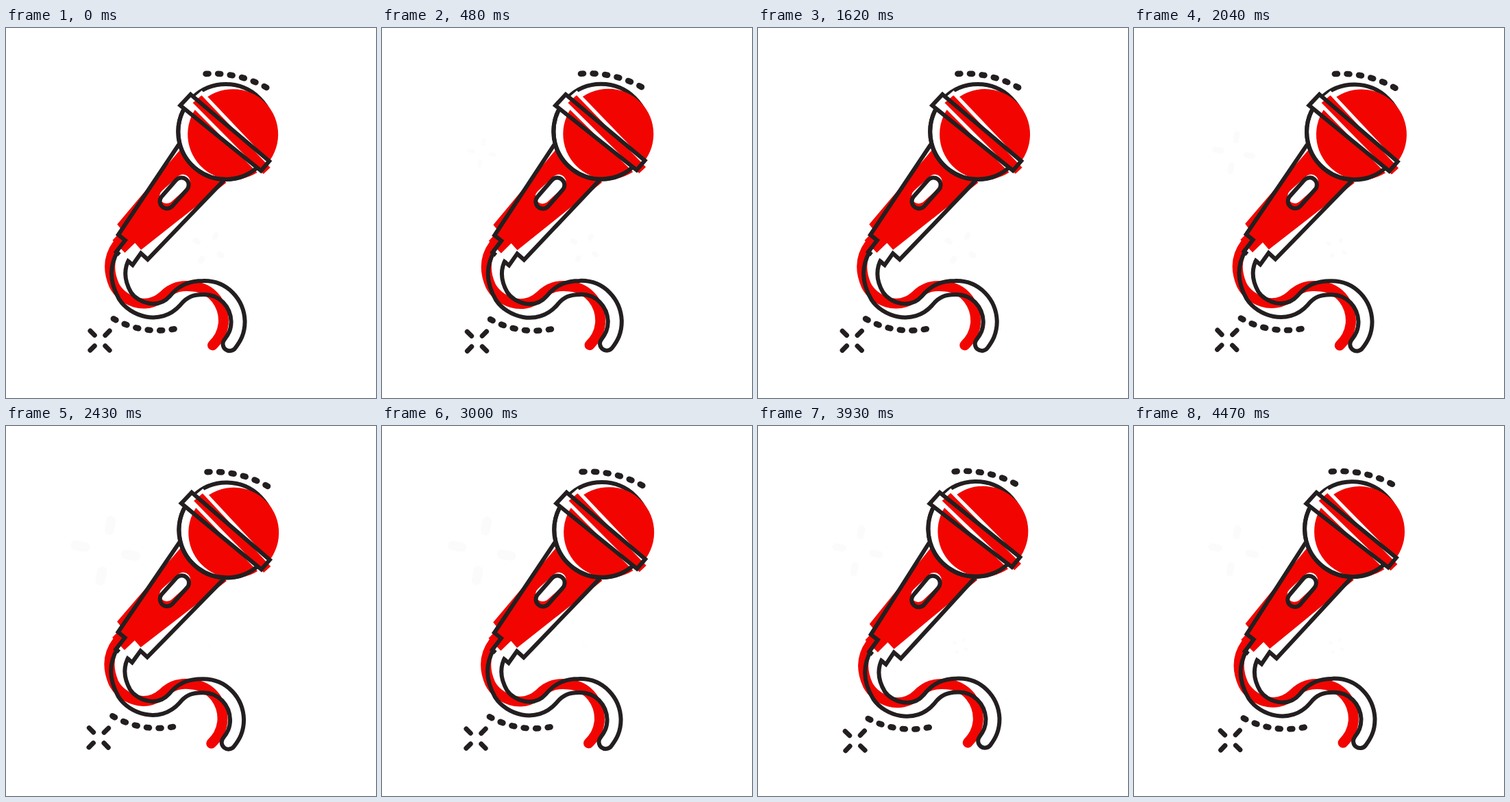
Write an HTML page that moves like this. It is 540x540 px and loops after 4.5 s.

```html
<!DOCTYPE html>
<html lang="en">
<head>
<meta charset="utf-8">
<title>Microphone</title>
<style>
  html, body { margin: 0; width: 100%; height: 100%; overflow: hidden; background: #fff; }
  svg { display: block; width: 100vw; height: 100vh; }
  .ink { fill: none; stroke: #231f20; stroke-width: 6; }
  .red { fill: #f20500; }
  .round { stroke-linecap: round; }
  .faint { fill: none; stroke: #fbfbfb; stroke-linecap: round; }
</style>
</head>
<body>
<svg viewBox="0 0 540 540">
  <defs>
    <path id="cable" d="M172 331C160 352 163 372 174 391C187 411 224 424 247 398C259 383 272 379 288 379C318 378 338 402 339 428C339 443 334 452 327 461"/>
    <path id="band" d="M269 97L384 194L372 208L254 113Z"/>
    <path id="slot" d="M256 229L235 253"/>
    <mask id="tube" maskUnits="userSpaceOnUse" x="0" y="0" width="540" height="540">
      <rect width="540" height="540" fill="#fff"/>
      <use href="#cable" fill="none" stroke="#000" stroke-width="14" stroke-linecap="round"/>
      <path d="M184 314L171 331" stroke="#000" stroke-width="32"/>
    </mask>
    <mask id="pill" maskUnits="userSpaceOnUse" x="0" y="0" width="540" height="540">
      <rect width="540" height="540" fill="#fff"/>
      <use href="#slot" stroke="#000" stroke-width="15" stroke-linecap="round"/>
    </mask>
  </defs>

  <g id="big" class="faint" stroke-width="14"></g>
  <g id="small" class="faint" stroke-width="8"></g>

  <g id="mic">
    <g transform="rotate(6.6 298 245)">
      <use href="#cable" class="round" fill="none" stroke="#f20500" stroke-width="15"/>
      <path class="red" d="M254 172L319 223L207 335L197 326L184 342L164 326L176 310L168 302Z"/>
      <use href="#slot" class="round" stroke="#fff" stroke-width="21"/>
    </g>
    <circle class="ink" cx="320.5" cy="151.5" r="69.5" style="fill:#fff"/>
    <use href="#band" fill="#fff"/>
    <g class="red" transform="rotate(6.2 298 245)">
      <circle cx="321" cy="152" r="66"/>
      <use href="#band" stroke="#fff" stroke-width="5"/>
    </g>

    <g class="ink">
      <path d="M258 121A69.5 69.5 0 0 0 368 202"/>
      <use href="#band"/>
      <path d="M252 170L164 302L174 310L161 327L166 331M318 222L207 338L197 329L185 346L179 341"/>
    </g>
    <use href="#slot" class="round" stroke="#231f20" stroke-width="27" mask="url(#pill)"/>
    <use href="#cable" class="round" fill="none" stroke="#231f20" stroke-width="26" mask="url(#tube)"/>
    <g id="dashes" class="ink round" style="stroke-width:8.6"></g>
    <g id="spark" class="ink round" style="stroke-width:7" transform="translate(137.5 456.5) rotate(45)"></g>
  </g>
</svg>
<script>
const FRAME = 30, LOOP = 4500, SWAY = 0.97;
const $ = id => document.getElementById(id);
const turn = x => 2 * Math.PI * x;

// Six dashes on a circle; a negative radius puts them below the centre
const dashArc = (cx, cy, r, from, to) => Array.from({ length: 6 }, (_, i) =>
  `<path d="M${cx - 2} ${cy - r}h4" transform="rotate(${from + (to - from) * i / 5} ${cx} ${cy})"/>`).join('');

const arms = (from, to) => [0, 90, 180, 270].map(a =>
  `<path d="M0 ${-from}V${-to}" transform="rotate(${a})"/>`).join('');

$('dashes').innerHTML = dashArc(302, 226.5, 160, -3.2, 28.4) + dashArc(222, 309.5, -132, 28.5, -9.6);
$('spark').innerHTML = arms(11, 20);
$('big').innerHTML = arms(30, 44);
$('small').innerHTML = arms(18, 22);

// Slow swing with a quick shake on top, held within its limits
function sway(n) {
  const v = Math.cos(turn((n - 81) / 100)) - .6 * Math.sin(turn((n - 31) / 12.5));
  return Math.max(-1, Math.min(1, v));
}

const pulse = n => .5 - .5 * Math.cos(turn(n / 18));

function draw(ms) {
  const n = Math.floor((ms % LOOP) / FRAME);
  const tilt = (sway(n) - .3) * SWAY;
  const u = pulse(n);
  $('mic').setAttribute('transform', `rotate(${tilt.toFixed(3)} 270 270)`);
  $('big').setAttribute('transform', `translate(145.5 182) rotate(10) scale(${.35 + .66 * u})`);
  $('big').setAttribute('opacity', Math.min(1, u * 5));
  $('small').setAttribute('transform', `translate(295.5 321) rotate(30) scale(${1 - .87 * u})`);
}

const start = performance.now();
function tick() {
  draw(performance.now() - start);
  requestAnimationFrame(tick);
}
draw(0);
requestAnimationFrame(tick);
</script>
</body>
</html>
```
